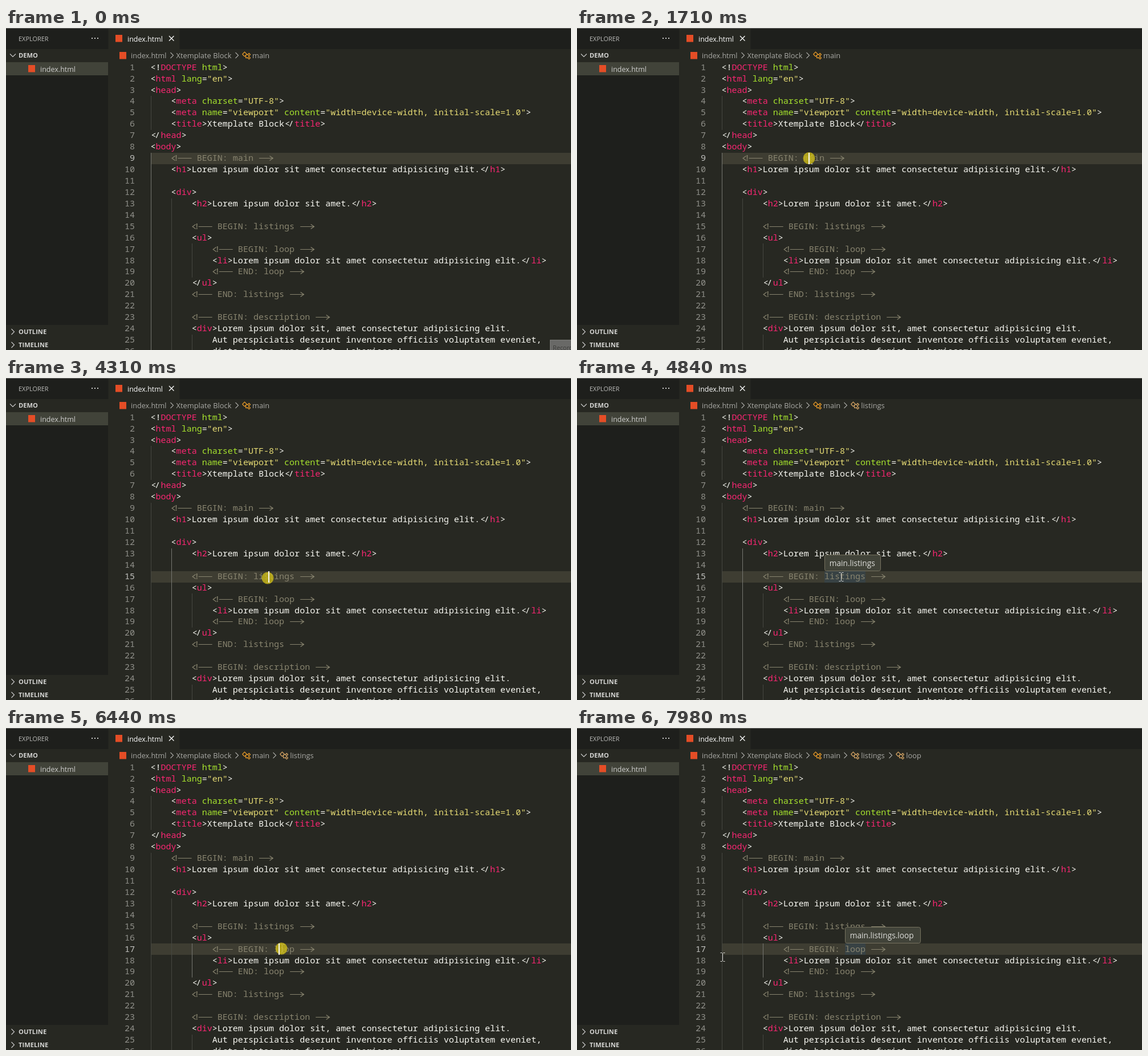
Recreate the animation shown at these times as an HTML page with a canvas. Size 991 by 565 pixels, loop 8 s.

```html
<!DOCTYPE html>
<html lang="en">
<head>
<meta charset="UTF-8">
<title>Editor hover demo</title>
<style>
html, body { margin: 0; width: 100%; height: 100%; overflow: hidden; background: #272822; }
canvas { display: block; }
</style>
</head>
<body>
<canvas id="stage" width="991" height="565"></canvas>
<script>
const W = 991, H = 565, LOOP = 8000, STEP = 70;
const ctx = document.getElementById('stage').getContext('2d');

const X0 = 253.5, CW = 9.022, LH = 19.93, TOP = 59.5;
const MONO = '500 15.04px "Noto Sans Mono", "DejaVu Sans Mono", monospace';
const UI = '"Open Sans", "Noto Sans", sans-serif';
const C = {
  bg: '#272822', side: '#1e1f1c', select: '#414339', row: '#3e3d32',
  text: '#f8f8f2', tag: '#f92672', attr: '#a6e22e', str: '#e6db74', note: '#88846f',
  num: '#90908a', numOn: '#c2c2bf', guide: '#464741', guideOn: '#767771',
  crumb: '#a9a9a5', file: '#e44d26', class1: '#ee9d28', class2: '#d9a766'
};

const note = s => '<' + '!-- ' + s + ' --' + '>';
const lines = [
  [0, '<!DOCTYPE html>'],
  [0, '<html lang="en">'],
  [0, '<head>'],
  [1, '<meta charset="UTF-8">'],
  [1, '<meta name="viewport" content="width=device-width, initial-scale=1.0">'],
  [1, '<title>Xtemplate Block</title>'],
  [0, '</head>'],
  [0, '<body>'],
  [1, note('BEGIN: main')],
  [1, '<h1>Lorem ipsum dolor sit amet consectetur adipisicing elit.</h1>'],
  [0, ''],
  [1, '<div>'],
  [2, '<h2>Lorem ipsum dolor sit amet.</h2>'],
  [0, ''],
  [2, note('BEGIN: listings')],
  [2, '<ul>'],
  [3, note('BEGIN: loop')],
  [3, '<li>Lorem ipsum dolor sit amet consectetur adipisicing elit.</li>'],
  [3, note('END: loop')],
  [2, '</ul>'],
  [2, note('END: listings')],
  [0, ''],
  [2, note('BEGIN: description')],
  [2, '<div>Lorem ipsum dolor sit, amet consectetur adipisicing elit.'],
  [3, 'Aut perspiciatis deserunt inventore officiis voluptatem eveniet,'],
  [3, 'dicta beatae quae fugiat. Laboriosam!']
];

// indent guides: level, first line, last line
const guides = [[0, 4, 6], [0, 9, 27], [1, 13, 27], [2, 17, 19], [2, 25, 27]];

// clicks: time, line, column, highlighted guide, circle centre, circle time
const clicks = [
  { t: -1, line: 9, guide: 1 },
  { t: 1710, line: 9, col: 17, guide: 1, x: 407, y: 228.5, hold: 140 },
  { t: 4310, line: 15, col: 23, guide: 2, x: 459, y: 351, hold: 130 },
  { t: 6440, line: 17, col: 25, guide: 3, x: 483, y: 387, hold: 140 }
];

const tips = [
  { from: 1230, full: 1450, to: 1710, line: 9, col: 16, len: 4, w: 51, text: 'main' },
  { from: 2910, full: 3050, to: 3850, line: 9, col: 16, len: 4, w: 51, text: 'main' },
  { from: 4640, full: 4840, to: 5920, line: 15, col: 20, len: 8, w: 99, text: 'main.listings' },
  { from: 6850, full: 6980, to: LOOP, line: 17, col: 24, len: 4, w: 133, text: 'main.listings.loop' }
];

// pointer: time, x, y
const path = [
  [390, 910, 522], [1160, 409, 231], [2510, 409, 231], [2710, 414, 230],
  [3650, 414, 230], [3720, 426, 231], [4240, 460, 351], [4440, 460, 351],
  [4510, 463, 349], [5780, 463, 349], [6370, 484, 387], [7370, 484, 387], [7980, 255, 401.5]
];

const rowTop = n => Math.round(TOP + (n - 1) * LH);
const baseline = n => Math.round(TOP + (n - 1) * LH + 14.2);
const colX = c => X0 + c * CW;

function rect(g, color, x, y, w, h) {
  g.fillStyle = color;
  g.fillRect(x, y, w, h);
}

function stroke(g, color, width, ...lists) {
  g.strokeStyle = color;
  g.lineWidth = width;
  g.beginPath();
  for (const p of lists)
    for (let i = 0; i < p.length; i += 2)
      i ? g.lineTo(p[i], p[i + 1]) : g.moveTo(p[i], p[i + 1]);
  g.stroke();
}

function label(g, s, x, y, size, color, weight = 400) {
  g.font = `${weight} ${size}px ${UI}`;
  g.fillStyle = color;
  g.fillText(s, x, y);
}

function mono(g, s, x, y, color) {
  g.font = MONO;
  g.fillStyle = color;
  for (let i = 0; i < s.length; i++)
    if (s[i] !== ' ') g.fillText(s[i], x + i * CW, y);
}

const chevron = (g, x, y, color) =>
  stroke(g, color, 1.1, [x - 2.5, y - 5, x + 2.5, y, x - 2.5, y + 5]);

function classIcon(g, x, y, color) {
  const gem = (cx, cy, r) => [cx - r, cy, cx, cy - r, cx + r, cy, cx, cy + r, cx - r, cy];
  stroke(g, color, 1.2, gem(x + 4.5, y + 5, 3.9), gem(x + 12.2, y + 5.6, 2.2), gem(x + 12.2, y + 11.4, 2.2),
    [x + 7.8, y + 5.6, x + 10, y + 5.6], [x + 6.6, y + 7, x + 6.6, y + 11.4, x + 10, y + 11.4]);
}

function openNote(g, x, base) {
  const y = base - 4.5;
  stroke(g, C.note, 1.2, [x + 7, y - 4, x + 1.5, y, x + 7, y + 4], [x + 12, y, x + 36, y]);
  mono(g, '!', x + 4.5, base, C.note);
}

function closeNote(g, x, base) {
  const y = base - 4.5;
  stroke(g, C.note, 1.2, [x + 1, y, x + 25, y], [x + 19.5, y - 4, x + 25.3, y, x + 19.5, y + 4]);
}

function codeLine(g, indent, src, base) {
  let col = indent * 4;
  if (src.startsWith('<!--')) {
    openNote(g, colX(col), base);
    mono(g, src.slice(5, -4), colX(col + 5), base, C.note);
    closeNote(g, colX(col + src.length - 3), base);
    return;
  }
  let inTag = false, named = false;
  for (const s of src.match(/<\/?!?|>|"[^"]*"|[\w-]+|\s+|./g) || []) {
    const x = colX(col);
    let color = C.text;
    if (s[0] === '<') {
      inTag = true;
      named = false;
    } else if (s === '>') {
      inTag = false;
    } else if (inTag && s[0] === '"') {
      color = C.str;
    } else if (inTag && /\w/.test(s)) {
      color = named ? C.attr : C.tag;
      named = true;
    }
    if (s === '</') {
      mono(g, '<', x + 1, base, color);
      mono(g, '/', x + CW - 1.5, base, color);
    } else {
      mono(g, s, x, base, color);
    }
    col += s.length;
  }
}

// unchanging text and window parts, drawn once on clear ground
function makeLayer() {
  const c = document.createElement('canvas');
  c.width = W;
  c.height = H;
  const g = c.getContext('2d');
  lines.forEach(([indent, src], i) => codeLine(g, indent, src, baseline(i + 1)));

  rect(g, C.side, 0, 0, W, 37);
  rect(g, C.side, 0, 0, 179, H);
  rect(g, C.bg, 179.5, 0, 125, 37);
  rect(g, C.bg, 0, 37, 179, 23);
  rect(g, C.select, 0, 60, 179, 23);
  rect(g, C.bg, 0, 521, 179, 44);
  rect(g, '#6a6a68', 0, 0, W, 1);

  label(g, 'EXPLORER', 22, 22.5, 10.95, '#bcbcba');
  for (const x of [151, 156, 161]) rect(g, '#c8c8c6', x - 1, 17, 2, 2);
  stroke(g, '#cccccc', 1.1, [7, 45.5, 12, 50.5, 17, 45.5]);
  label(g, 'DEMO', 22, 52.2, 11.2, '#d4d4d2', 700);
  label(g, 'index.html', 60, 76.7, 12.5, '#cfcfcd');
  chevron(g, 12, 533, '#cccccc');
  label(g, 'OUTLINE', 22, 537.2, 11.2, '#d4d4d2', 700);
  chevron(g, 12, 556, '#cccccc');
  label(g, 'TIMELINE', 22, 560.2, 11.2, '#d4d4d2', 700);

  for (const [x, y] of [[38, 65], [191, 12], [198, 42]]) rect(g, C.file, x + 1, y, 12, 12.5);
  label(g, 'index.html', 213, 23.6, 12.5, '#ffffff');
  stroke(g, '#ffffff', 1.3, [286, 14, 294.5, 22.5], [294.5, 14, 286, 22.5]);

  label(g, 'index.html', 219, 53, 12.6, C.crumb);
  chevron(g, 291, 48, C.crumb);
  label(g, 'Xtemplate Block', 298.5, 53, 12.9, C.crumb);
  chevron(g, 405, 48, C.crumb);
  classIcon(g, 414, 41, C.class1);
  label(g, 'main', 432, 53, 12.8, C.crumb);
  return c;
}

function crumb(x, s) {
  chevron(ctx, x, 48, C.crumb);
  classIcon(ctx, x + 9, 41, C.class2);
  label(ctx, s, x + 27.3, 53, 12.8, C.crumb);
}

function drawTip(tip, t) {
  if (t < tip.from || t >= tip.to) return;
  const n = Math.round((tip.full - tip.from) / STEP) + 1;
  const k = Math.floor((t - tip.from) / STEP) + 1;
  const x = Math.round(colX(tip.col)), y = rowTop(tip.line) - 29;
  ctx.globalAlpha = t >= tip.full ? 1 : Math.min(1, k / n);
  ctx.beginPath();
  ctx.roundRect(x + 0.5, y + 0.5, tip.w - 1, 28, 3);
  ctx.fillStyle = C.select;
  ctx.fill();
  ctx.strokeStyle = '#75715e';
  ctx.lineWidth = 1;
  ctx.stroke();
  label(ctx, tip.text, x + 8.7, y + 20, 13.7, '#dededb');
  ctx.globalAlpha = 1;
}

function pointerAt(t) {
  if (t < path[0][0]) return null;
  let i = path.length - 1;
  while (path[i][0] > t) i--;
  const [ta, xa, ya] = path[i];
  if (i === path.length - 1) return [xa, ya];
  const [tb, xb, yb] = path[i + 1];
  const u = Math.floor((t - ta) / STEP) * STEP / (tb - ta);
  const e = u * u * (3 - 2 * u);
  return [xa + (xb - xa) * e, ya + (yb - ya) * e];
}

function drawPointer([px, py]) {
  const x = Math.round(px) + 0.5, y = Math.round(py);
  const beam = [
    [x, y - 7, x, y + 7],
    [x - 4, y - 7.5, x - 1, y - 7.5], [x + 1, y - 7.5, x + 4, y - 7.5],
    [x - 4, y + 7.5, x - 1, y + 7.5], [x + 1, y + 7.5, x + 4, y + 7.5]
  ];
  stroke(ctx, '#d8d8d4', 1, ...beam);
}

const layer = makeLayer();

function draw(t) {
  const state = clicks.filter(c => c.t <= t).pop();
  rect(ctx, C.bg, 0, 0, W, H);
  rect(ctx, C.row, 254, rowTop(state.line), W - 254, 20);

  for (const tip of tips)
    if (t >= tip.from && t < tip.to)
      rect(ctx, 'rgba(38,79,120,0.25)', colX(tip.col), rowTop(tip.line), tip.len * CW, 20);

  guides.forEach(([level, a, b], i) =>
    rect(ctx, i === state.guide ? C.guideOn : C.guide,
      Math.floor(colX(level * 4) + 0.5), rowTop(a), 1, (b - a + 1) * LH));

  for (let n = 1; n <= lines.length; n++) {
    const s = String(n);
    mono(ctx, s, 226 - s.length * CW, baseline(n), n === state.line ? C.numOn : C.num);
  }
  ctx.drawImage(layer, 0, 0);

  if (t >= 4510) crumb(471, 'listings');
  if (t >= 6580) crumb(550, 'loop');
  tips.forEach(tip => drawTip(tip, t));

  if (t < 70) {
    rect(ctx, '#7c7c79', 954, 547, 37, 18);
    rect(ctx, '#696967', 955, 548, 36, 17);
    label(ctx, 'Record', 959, 565, 10.8, '#3c3c3a');
  }

  const p = pointerAt(t);
  if (p) drawPointer(p);
  if (state.col) {
    const age = t - state.t;
    if (age < state.hold) {
      ctx.fillStyle = 'rgba(200,183,24,0.82)';
      ctx.beginPath();
      ctx.arc(state.x, state.y, 10.5, 0, Math.PI * 2);
      ctx.fill();
    }
    if (Math.floor(age / 512) % 2 === 0)
      rect(ctx, C.text, Math.round(colX(state.col)) - 1, rowTop(state.line), 2, 20);
  }
}

const start = performance.now();
function tick() {
  draw((performance.now() - start) % LOOP);
  requestAnimationFrame(tick);
}
tick();
</script>
</body>
</html>
```
